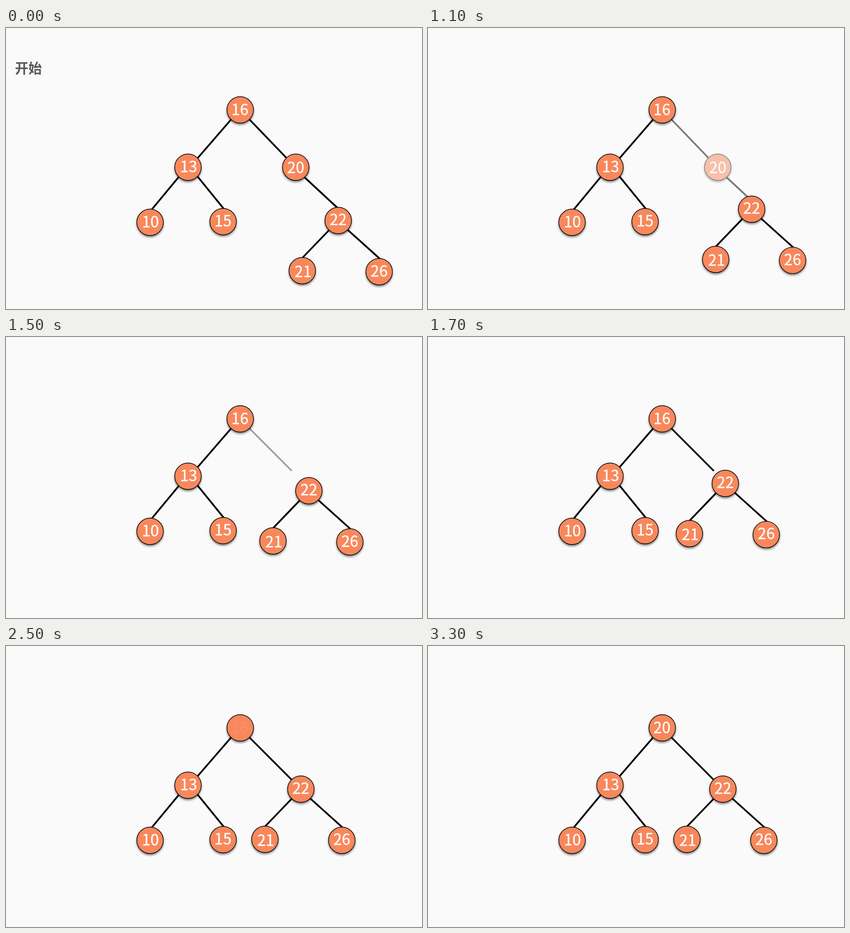
Write an HTML page that moves like this. It is 909 by 616 pixels and loops after 3.5 s.

```html
<!DOCTYPE html>
<html lang="zh">
<head>
<meta charset="utf-8">
<style>
html, body { margin: 0; width: 100%; height: 100%; overflow: hidden; background: #fafafa; }
svg { display: block; width: 100%; height: 100%; }
text { font-family: "Noto Sans CJK SC", "Noto Sans CJK", "Noto Sans CJK JP", sans-serif; }
.num { font-size: 33.5px; text-anchor: middle; fill: #fff; stroke: #fff; stroke-width: .4; }
circle { fill: #f8885c; stroke: #000; stroke-width: 1.4; filter: url(#shadow); }
line { stroke: #000; stroke-width: 3.8; }
.title { font-size: 29.5px; font-weight: 700; fill: #585858; }
</style>
</head>
<body>
<svg viewBox="0 0 909 616">
  <defs>
    <filter id="shadow" x="-30%" y="-30%" width="160%" height="170%">
      <feDropShadow dx="0" dy="3" stdDeviation="2.2" flood-color="#000" flood-opacity=".5"/>
    </filter>
  </defs>
  <text id="title" class="title" x="19.5" y="99">开始</text>
  <g id="fixed"></g>
  <g id="removed"></g>
  <g id="link"></g>
  <g id="subtree"></g>
</svg>
<script>
const LOOP = 3500, STEP = 100;
const $ = id => document.getElementById(id);

function add(parent, tag, attrs, content = "") {
  const el = document.createElementNS("http://www.w3.org/2000/svg", tag);
  for (const key in attrs) el.setAttribute(key, attrs[key]);
  el.textContent = content;
  return parent.appendChild(el);
}

const edge = (parent, x1, y1, x2, y2) => add(parent, "line", { x1, y1, x2, y2 });
const label = (parent, value, x, midY) =>
  add(parent, "text", { class: "num", x, y: midY + 12.3 }, value);

// dx and ty place the label relative to the circle's centre
function node(parent, value, cx, cy, dx, ty) {
  add(parent, "circle", { cx, cy, r: 29 });
  return label(parent, value, cx + dx, cy + ty);
}

const fixed = $("fixed"), removed = $("removed"), subtree = $("subtree");

edge(fixed, 491.5, 201, 419, 285);
edge(fixed, 377.5, 326.5, 318, 398.5);
edge(fixed, 418.5, 325.5, 476, 396.5);
node(fixed, 13, 397.7, 305.2, 1.5, -2);
node(fixed, 10, 314.8, 426, 0.7, -1);
node(fixed, 15, 474.4, 424.5, -0.2, -2);

edge(removed, 532, 200.5, 612.5, 284.5);
edge(removed, 652, 327, 724, 394);
node(removed, 20, 633.2, 305.2, 0, 0);

edge($("link"), 532, 200.5, 624.5, 293.5);

const oldRoot = node(fixed, 16, 511.8, 179.5, -0.6, -1);
const newRoot = label(fixed, 20, 511.2, 179);

edge(subtree, 706, 443, 648, 503.5);
edge(subtree, 746, 442, 817, 506);
node(subtree, 22, 725.9, 422, 0, -2);
node(subtree, 21, 647.4, 532, 1.8, 2);
node(subtree, 26, 815.4, 534.2, 0, -2);

const progress = (t, start, end) => Math.min(1, Math.max(0, (t - start) / (end - start)));
const easeOut = u => 1 - (1 - u) ** 2;

function draw(t) {
  $("title").setAttribute("opacity", t < 800 ? 1 : 0);
  removed.setAttribute("opacity", 1 - progress(t, 950, 1250));
  $("link").setAttribute("opacity", progress(t, 1393, 1693));
  const move = easeOut(progress(t, 982, 1948));
  subtree.setAttribute("transform", `translate(${-81.6 * move} ${-108.2 * move})`);
  oldRoot.setAttribute("opacity", 1 - progress(t, 2230, 2520));
  newRoot.setAttribute("opacity", progress(t, 2750, 3150));
}

const begin = performance.now();
function tick() {
  const t = (performance.now() - begin) % LOOP;
  draw(Math.floor(t / STEP) * STEP);
  requestAnimationFrame(tick);
}
draw(0);
requestAnimationFrame(tick);
</script>
</body>
</html>
```
